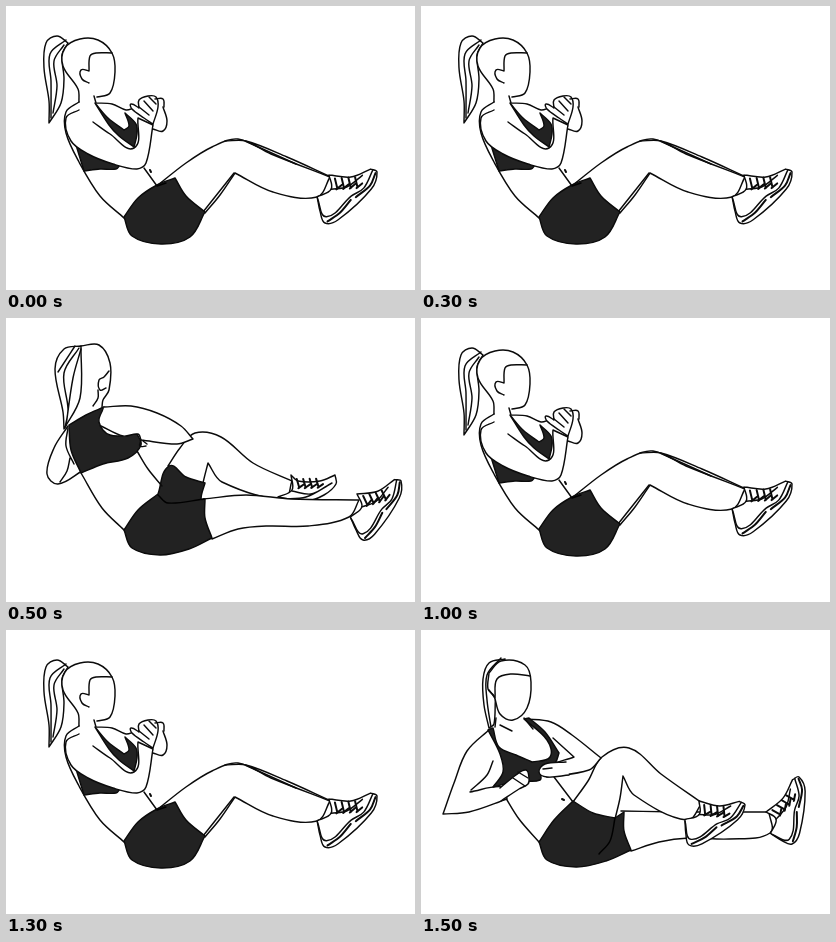
Animation of 409x284 px, one loop 2000 ms. Source, as an HTML page:

```html
<!DOCTYPE html>
<html lang="en">
<head>
<meta charset="utf-8">
<title>Seated twist</title>
<style>
html, body { margin: 0; width: 100%; height: 100%; overflow: hidden; background: #fff; }
svg { display: block; width: 100%; height: 100%; }
path { fill: none; stroke: #0b0b0b; stroke-width: 1.45; stroke-linecap: round; stroke-linejoin: round; }
.skin { fill: #fff; }
.cloth { fill: #222; }
.bold { stroke-width: 2; }
.seam { stroke: #000; }
.pose { opacity: 0; }
</style>
</head>
<body>
<svg id="stage" viewBox="0 0 409 284"></svg>
<script>
const LOOP = 2000;
const stage = document.getElementById("stage");

function add(parent, tag, attrs) {
  const el = document.createElementNS("http://www.w3.org/2000/svg", tag);
  for (const key in attrs) el.setAttribute(key, attrs[key]);
  return parent.appendChild(el);
}

// Smooth curve through the points; handles follow the neighbours' direction.
function smooth(pts) {
  const handle = (i, len) => {
    const a = pts[Math.max(i - 1, 0)], b = pts[Math.min(i + 1, pts.length - 1)];
    const k = len / 3 / (Math.hypot(b[0] - a[0], b[1] - a[1]) || 1);
    return [(b[0] - a[0]) * k, (b[1] - a[1]) * k];
  };
  let d = "";
  for (let i = 1; i < pts.length; i++) {
    const p = pts[i - 1], q = pts[i];
    const len = Math.hypot(q[0] - p[0], q[1] - p[1]);
    const h = handle(i - 1, len), g = handle(i, len);
    d += `C${p[0] + h[0]} ${p[1] + h[1]} ${q[0] - g[0]} ${q[1] - g[1]} ${q[0]} ${q[1]}`;
  }
  return d;
}

// "/" is a corner at the preceding point, ";" starts a new line.
function outline(text, map = p => p) {
  return text.split(";").map(line => {
    let last = null, d = "";
    for (const part of line.split("/")) {
      const n = part.trim().split(/\s+/).map(Number);
      const pts = last ? [last] : [];
      for (let i = 0; i < n.length; i += 2) pts.push(map([n[i], n[i + 1]]));
      if (!last) d = "M" + pts[0].join(" ");
      d += smooth(pts);
      last = pts[pts.length - 1];
    }
    return d;
  }).join("");
}

function pose(shown) {
  const group = add(stage, "g", { class: "pose" });
  const frames = shown.map((opacity, i) => ({ opacity, offset: i / 4, easing: "step-end" }));
  frames.push({ opacity: shown[3], offset: 1 });
  const anim = group.animate(frames, { duration: LOOP, iterations: Infinity });
  anim.startTime = document.timeline.currentTime;

  const put = (cls, text, map) => add(group, "path", { class: cls, d: outline(text, map) });
  // Axes of a shoe, in percent: ankle to toe and ankle to heel.
  const axes = (o, t, h) => ([u, v]) =>
    [0, 1].map(k => o[k] + (u * (t[k] - o[k]) + v * (h[k] - o[k])) / 100);
  const laces = map => {
    for (let u = 13; u < 60; u += 14) {
      put("bold", `${u} 8 ${u + 7} 30; ${u + 5} 31 ${u + 16} 22`, map);
    }
  };
  const shoe = (...anchors) => {
    const map = axes(...anchors);
    put("skin", "0 0 46 7 86 -7 / 100 0 91 35 27 95 0 100 -12 76 -21 44 / 7 30 0 0", map);
    put("line", "-20 48 2 87 50 47 75 32 91 -5; 7 30 40 27 70 5", map);
    put("bold", "5 97 30 80 50 55; 60 50 88 27 97 2", map);
    laces(map);
  };
  return {
    line: t => put("line", t), skin: t => put("skin", t), cloth: t => put("cloth", t),
    seam: t => put("seam", t), bold: t => put("bold", t),
    laces: (...a) => laces(axes(...a)), shoe
  };
}

function center() {
  const p = pose([1, 0, 1, 0]);
  // head
  p.skin("62 37 51 30 40 37 38 62 43 95 43 117 / 55 97 58 73 56 49 62 37");
  p.line("60 34 44 48 45 75 45 112; 58 39 48 55 51 80 47 107");
  p.skin("91 91 104 87 109 66 106 47 92 34 74 33 59 42 57 60 72 83 73 96");
  p.line("106 47 / 90 47 84 50 83 65 / 75 64 76 73 83 77");
  // torso
  p.line("88 90 90 97 / 106 98 120 104 128 102");
  p.line("73 96 60 106 60 127 73 156 94 190 118 212; 138 162 151 180");
  p.cloth("70 139 90 151 114 159 / 110 163 94 163 78 165 / 70 139");
  p.skin("73 104 60 112 65 135 82 148 107 158 131 163 140 157 147 119 / 132 112 / 128 142 104 128 87 116");
  p.cloth("89 97 102 112 118 124 / 123 120 119 107 / 130 118 131 128 128 141 / 113 130 103 119 89 97");
  p.bold("144 164 145 166");
  // hands
  p.skin("147 123 157 125 161 115 157 101");
  p.skin("147 118 138 112 126 103 125 98 133 102 / 133 94 142 90 150 91 152 101 147 118");
  p.line("133 101 143 109; 138 95 147 105; 143 91 150 98; 149 93 157 93 158 101");
  // legs
  p.skin("152 179 180 157 206 141 232 133 265 148 324 171 / 311 191 267 186 229 167 / 214 189 199 207");
  p.line("219 135 240 135 281 151 323 170; 239 135 290 158; 197 206 228 167");
  p.cloth("118 211 132 192 151 179 169 172 / 180 190 199 206 / 184 231 155 238 126 230 118 211");
  p.seam("151 180 160 177");
  p.shoe([323, 169], [371, 166], [319, 217]);
}

function right() {
  const p = pose([0, 1, 0, 0]);
  // legs
  p.skin("162 148 174 130 189 115 215 119 247 145 286 163 / 278 181 216 164 202 145 / 197 165 194 182");
  p.skin("285 157 292 163 314 163 329 157 / 330 166 318 177 300 183 272 179 / 286 172 285 157");
  p.line("286 173 305 176 321 168; 276 181 300 179 326 165");
  p.laces([285, 158], [331, 157], [282, 198]);
  p.skin("198 181 240 177 285 181 353 182 / 343 199 302 208 262 208 232 211 206 221");
  p.cloth("118 212 132 192 152 176 / 163 148 180 159 199 165 / 195 181 199 181 / 199 200 206 220 / 183 231 154 237 126 230 118 212");
  p.seam("152 177 162 185 198 181");
  p.shoe([351, 176], [395, 163], [357, 222]);
  // torso and arms
  p.line("75 155 96 190 118 212; 131 133 142 151 156 168");
  p.skin("62 108 48 130 41 156 52 166 76 153");
  p.line("62 110 60 128 68 146; 64 140 61 153 54 164");
  p.cloth("63 107 80 97 98 89 / 93 104 104 117 131 116 / 135 127 122 140 97 146 75 155 / 65 132 63 107");
  p.skin("98 89 125 88 151 95 175 108 187 121 / 171 126 135 122 / 132 116 117 118 95 108");
  p.line("135 122 134 128 140 128; 137 123 141 126");
  // head
  p.skin("75 28 93 27 104 45 103 72 97 82 96 89");
  p.skin("75 28 58 31 49 51 57 94 58 111 / 74 80 75 28");
  p.line("73 30 58 55 62 91 59 110; 75 31 67 60 60 108; 69 28 52 54");
  p.line("103 53 98 59 93 62 94 72 100 70; 92 72 92 80 87 88");
}

function left() {
  const p = pose([0, 0, 0, 1]);
  // legs
  p.skin("200 181 265 182 348 182 / 349 203 308 209 268 208 238 212 210 221");
  p.shoe([345, 182], [378, 147], [371, 214]);
  p.skin("152 172 167 151 181 127 208 118 240 144 281 173 / 266 190 213 165 202 146 / 199 168 194 189");
  p.cloth("118 212 133 190 152 171 / 172 183 194 188 / 203 182 / 203 201 210 220 / 185 231 155 237 126 230 118 212");
  p.seam("194 188 189 211 178 224");
  p.shoe([278, 171], [324, 175], [268, 215]);
  // torso and arms
  p.line("83 165 98 189 118 212; 133 147 152 172");
  p.bold("141 169 143 170");
  p.skin("69 99 46 121 33 153 22 184 / 48 182 86 169 / 82 157 49 162");
  p.line("72 131 66 145 50 160");
  p.skin("104 89 130 92 151 105 180 128 / 168 140 126 147 / 124 138 153 127 / 132 108");
  p.cloth("67 100 72 98 / 78 117 95 125 111 132 / 129 127 126 110 103 89 / 108 88 / 124 102 138 123 / 134 133 120 140 119 150 97 151 72 157 / 82 142 79 124 67 100");
  p.line("75 88 74 97; 103 88 112 99; 79 95 91 101");
  // hands
  p.skin("79 158 95 145 105 140 108 148 107 154 98 159 80 171");
  p.skin("148 145 126 147 118 142 124 134 145 132");
  p.line("97 142 107 148; 92 148 104 156; 122 139 131 138");
  // head
  p.skin("84 29 68 33 62 49 63 75 68 98 / 73 94 75 64 84 29");
  p.line("80 28 66 45 66 70 70 97");
  p.skin("68 43 80 31 104 35 110 52 106 78 92 90 79 84 73 66 67 59 68 43");
  p.line("109 46 / 90 44 76 49 74 68 / 68 60");
}

center();
right();
left();
</script>
</body>
</html>
```
